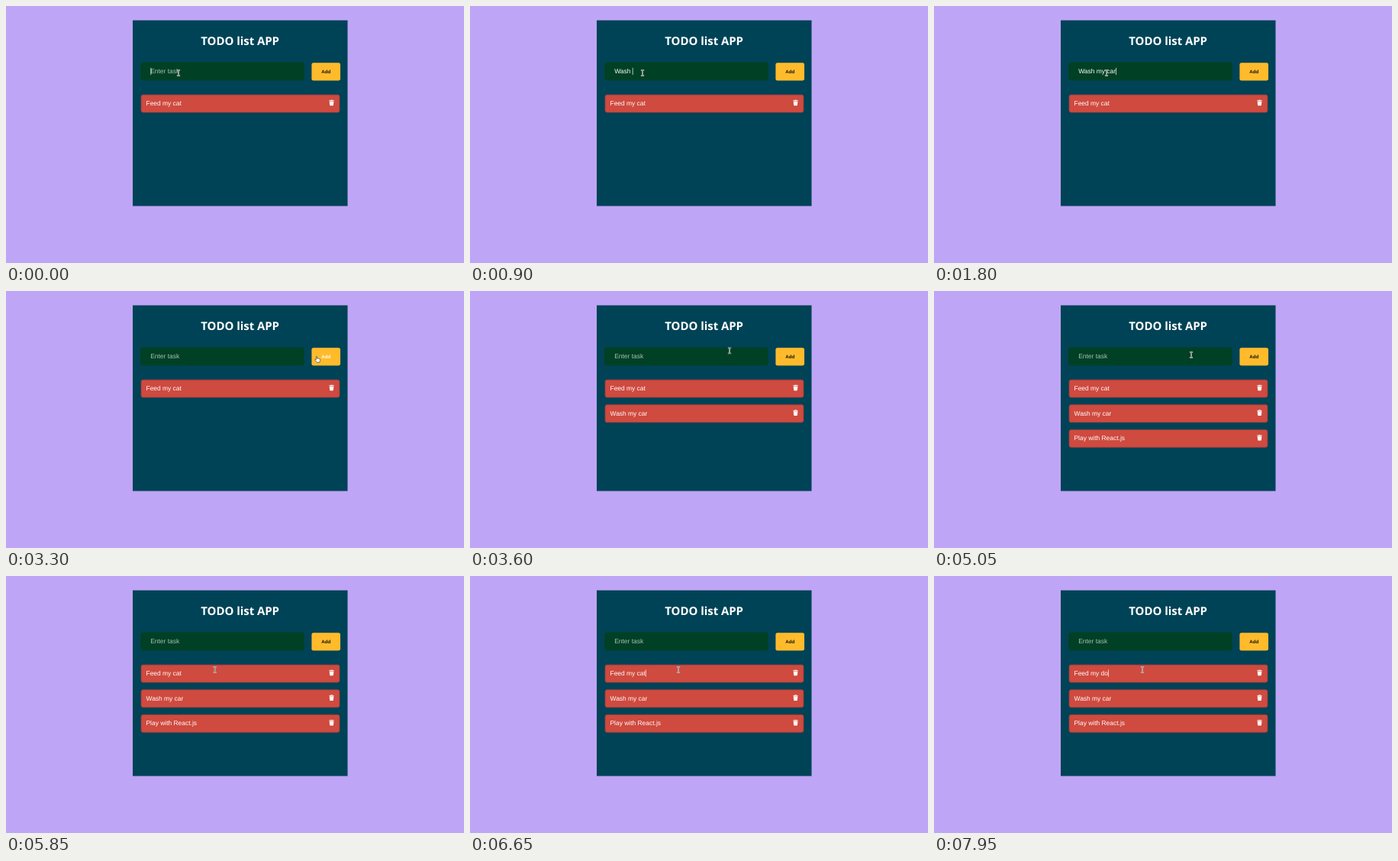
An HTML page for the animation above (8 s loop, 600 by 336 pixels).

```html
<!DOCTYPE html>
<html lang="en">
<head>
<meta charset="utf-8">
<title>TODO list APP</title>
<style>
  html, body { margin: 0; width: 100%; height: 100%; overflow: hidden; background: #bfa5f6; }
  svg { display: block; width: 100%; height: 100%; }
  text { font: 8.43px "Liberation Sans", Arial, sans-serif; fill: #fff; white-space: pre; text-rendering: geometricPrecision; }
  .title { font: 700 14.9px "Open Sans", "Noto Sans", sans-serif; text-anchor: middle; }
  .add { font-weight: 700; font-size: 6.2px; text-anchor: middle; }
  .row rect { fill: #cf4a3f; stroke: #b53c3c; stroke-width: .8; }
</style>
</head>
<body>
<svg viewBox="0 0 600 336">
  <defs>
    <g id="trash" fill="#fff">
      <path d="M-3.2-3.2h1.7l.5-.6h2l.5.6h1.7v.9h-6.4z"/>
      <path d="M-2.8-1.8h5.6l-.4 4.9q-.1.7-.8.7h-3.2q-.7 0-.8-.7z"/>
    </g>
    <path id="beam" d="M-2.1-3.5h1.3q.8 0 .8.7q0-.7.8-.7h1.3M0-2.8v5.6M-2.1 3.5h1.3q.8 0 .8-.7q0 .7.8.7h1.3"/>
  </defs>
  <rect width="600" height="336" fill="#bfa5f6"/>
  <rect x="166" y="18.7" width="281.5" height="242.8" fill="#004356"/>
  <text class="title" x="306.6" y="51.2">TODO list APP</text>
  <rect x="176" y="73.4" width="214.6" height="24.2" rx="4" fill="#004025"/>
  <text id="field" x="189.2" y="88.4"></text>
  <rect x="400.4" y="74.2" width="37.6" height="23.4" rx="2.4" fill="#ffbb2b"/>
  <text id="add" class="add" x="419.2" y="88.3">Add</text>
  <g id="rows"></g>
  <rect id="caret" width=".7" height="9.2" fill="#fff"/>
  <g id="pointer">
    <g id="ibeam" fill="none">
      <use href="#beam" stroke="#f4f4f4" stroke-width="1.5"/>
      <use href="#beam" stroke="#333" stroke-width=".55"/>
    </g>
    <path id="arrow" d="M0 0v7l1.6-1.5 1.1 2.5 1.1-.5-1.1-2.4h2.2z" fill="#222" stroke="#fff" stroke-width=".5"/>
    <path id="hand" d="M-1.7-3.5q.7-.6 1.2.2v2.5l.9-.1.4.3.9-.1.4.4.8 0q.6.2.6.8v1.7l-.7 1.5v.6h-3.7l-.3-.8-2-2.3q-.3-.8.5-.9l1 .8z" fill="#fff" stroke="#222" stroke-width=".55" stroke-linejoin="round"/>
  </g>
</svg>
<script>
const LOOP = 8000, LEFT = 183.5, TOP = 116.1, PITCH = 32.65;
const $ = id => document.getElementById(id);
const clamp = v => Math.max(0, Math.min(1, v));
const ease = v => v * v * (3 - 2 * v);
const show = (el, on) => el.setAttribute("visibility", on ? "visible" : "hidden");

const rows = ["Feed my cat", "Wash my car", "Play with React.js"].map((label, i) => {
  const y = TOP + i * PITCH;
  $("rows").insertAdjacentHTML("beforeend", `<g class="row">
    <rect x="177.1" y="${y + .1}" width="259.8" height="22.8" rx="2.4"/>
    <text x="${LEFT}" y="${y + 14}">${label}</text>
    <use href="#trash" x="426.5" y="${y + 10.4}"/></g>`);
  const g = $("rows").lastElementChild;
  return { g, label, text: g.querySelector("text"), mid: y + 11.5 };
});

// Text entries: first key, last key, click on Add
const entries = [
  { row: 1, from: 250, to: 1650, add: 3230 },
  { row: 2, from: 3850, to: 4450, add: 4720 }
];
const ENTER = 170;

// Pointer stops: time, x, y
const path = [
  [0, 226, 87.5], [2150, 226, 87.5], [2750, 409, 89], [3300, 408, 89],
  [3600, 340, 78], [3760, 315, 84], [4430, 315, 84], [4650, 410, 88],
  [4820, 409, 88], [5050, 337, 83.5], [5900, 273, 122.5], [LOOP, 273, 122.5]
];
const FOCUS = 6100;
const edits = [[0, "cat"], [6950, "ca"], [7100, "c"], [7250, ""], [7550, "d"], [7850, "do"]];

function pointerAt(t) {
  const i = path.findIndex(p => p[0] > t);
  const [a, b] = [path[i - 1], path[i]];
  const k = ease((t - a[0]) / (b[0] - a[0]));
  return [a[1] + (b[1] - a[1]) * k, a[2] + (b[2] - a[2]) * k];
}

function typedAt(t) {
  const e = entries.find(e => t >= e.from && t < e.add);
  if (!e) return "";
  const word = rows[e.row].label;
  return word.slice(0, 1 + Math.floor((word.length - 1) * clamp((t - e.from) / (e.to - e.from))));
}

function placeCaret(text, empty) {
  const x = +text.getAttribute("x") + (empty ? .3 : text.getComputedTextLength());
  $("caret").setAttribute("x", x);
  $("caret").setAttribute("y", text.getAttribute("y") - 7.6);
}

function draw(t) {
  const typed = typedAt(t);
  $("field").textContent = typed || "Enter task";
  $("field").style.fill = typed ? "#fff" : "#a9c2b4";

  entries.forEach(e => {
    const { g, mid } = rows[e.row];
    const k = ease(clamp((t - e.add - 90) / ENTER));
    show(g, k > 0);
    g.setAttribute("transform", `translate(307 ${mid}) scale(${k}) translate(-307 ${-mid})`);
  });

  const tail = edits.filter(e => e[0] <= t).pop()[1];
  rows[0].text.textContent = "Feed my " + tail;

  const inField = t < 2700 || (t > 3760 && t < 4600);
  const editing = t >= FOCUS;
  const blink = editing && t < 6950 ? (t - FOCUS) % 500 < 250 || t > 6600 : true;
  if (editing) placeCaret(rows[0].text);
  else placeCaret($("field"), !typed);
  show($("caret"), (inField || editing) && blink);

  const [x, y] = pointerAt(t);
  const overAdd = x > 400.4;
  const overText = (x < 390.6 && y > 73.4 && y < 97.6) || y > TOP;
  $("pointer").setAttribute("transform", `translate(${x} ${y})`);
  show($("hand"), overAdd);
  show($("ibeam"), overText);
  show($("arrow"), !overAdd && !overText);
  $("add").style.fill = overAdd ? "#fff" : "#111";
}

function tick() {
  draw(performance.now() % LOOP);
  requestAnimationFrame(tick);
}
tick();
</script>
</body>
</html>
```
